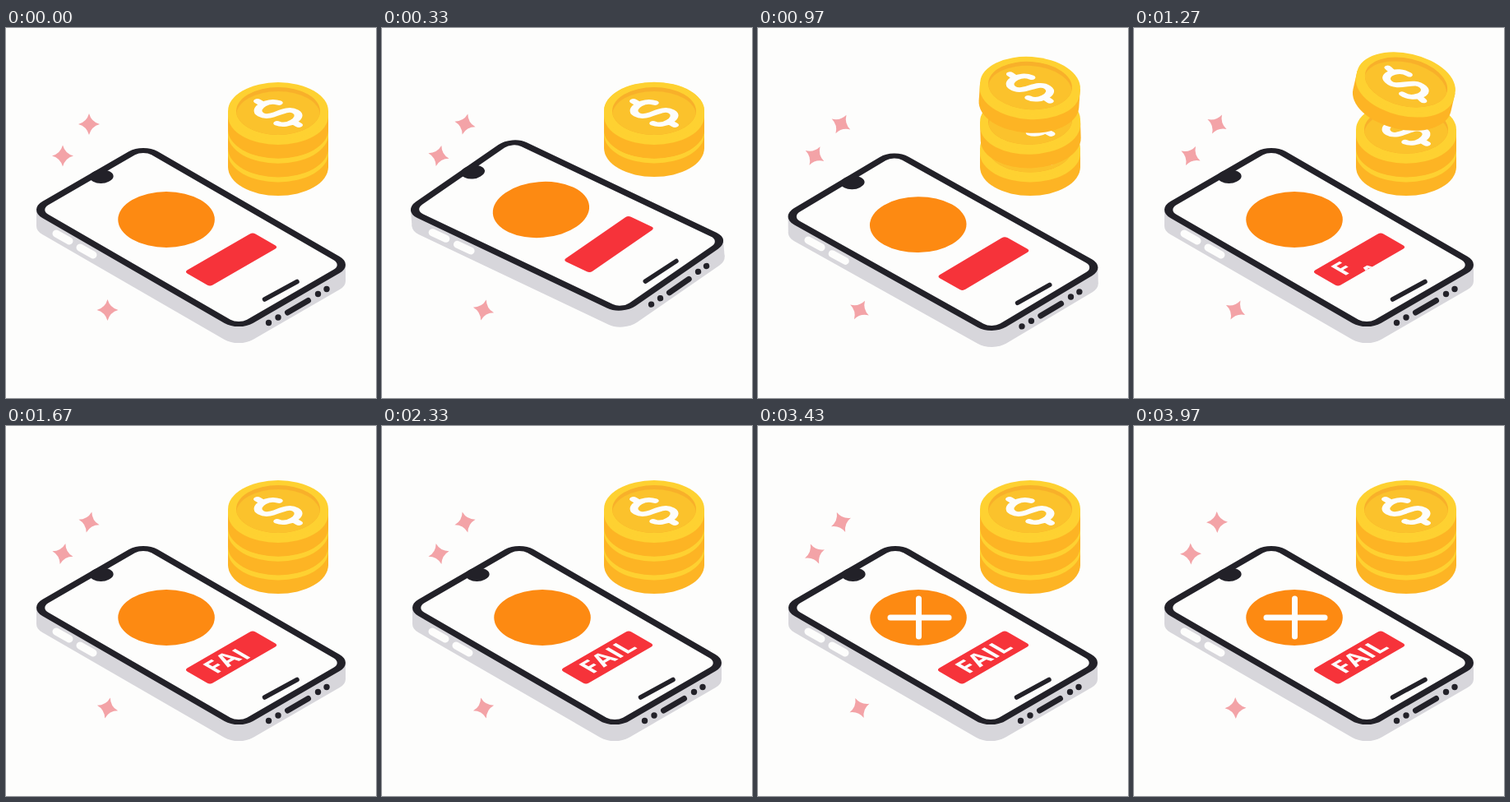
Write an HTML page that moves like this. It is 450 by 450 pixels and loops after 4 s.

```html
<!DOCTYPE html>
<html lang="en">
<head>
<meta charset="utf-8">
<title>Payment failed</title>
<style>
  html, body { margin: 0; width: 100%; height: 100%; overflow: hidden; background: #fdfdfc; }
  svg { display: block; width: 100vw; height: 100vh; }
  .ink { fill: #222128; }
  .line { fill: none; stroke: #222128; stroke-linecap: round; }
  .white { fill: none; stroke: #fdfdfc; stroke-linecap: round; stroke-linejoin: round; }
  .label text { font: 700 30px "Open Sans", "Noto Sans", sans-serif; fill: #fdfdfc; text-anchor: middle; }
</style>
</head>
<body>
<svg viewBox="0 0 450 450">
  <defs>
    <clipPath id="badge"><rect x="37.3" y="-49.3" width="36" height="96" rx="4"/></clipPath>
    <clipPath id="dish"><ellipse rx="51" ry="29"/></clipPath>
    <path id="star" fill="#f3a3a7" d="M0-13Q2.8-2.8 13 0Q2.8 2.8 0 13Q-2.8 2.8-13 0Q-2.8-2.8 0-13Z"/>
    <g id="coin">
      <path fill="#fdb424" d="M-61 0V22.7A61 35 0 0 0 61 22.7V0Z"/>
      <path fill="#fed131" d="M-61 0V6A61 35 0 0 0 61 6V0Z"/>
      <ellipse rx="61" ry="35" fill="#fed131"/>
      <ellipse rx="51" ry="29" fill="#f8b02a"/>
      <g clip-path="url(#dish)"><ellipse cy="5" rx="51" ry="29" fill="#fbc22c"/></g>
      <path class="white" stroke-width="8" transform="matrix(.866 -.5 .866 .5 0 2.5)"
        d="M13-12C11-19 5-21 0-21C-8-21-14-17-14-10.5C-14-3-7-1.5 0 0C7 1.5 14 3 14 10.5C14 17 8 21 0 21C-6 21-12 18-13 12M0-21V-29M0 21V29"/>
    </g>
  </defs>

  <g id="stars"></g>

  <g id="phone">
    <!-- body -->
    <g fill="#d7d6db">
      <path d="M37 221L413 288V308L37 241Z"/>
      <rect x="-147.9" y="-80.9" width="295.8" height="161.8" rx="20" transform="matrix(.866 .5 -.866 .5 225 274.5)"/>
    </g>
    <path class="white" stroke-width="9" d="M61 250L77 259M90 267L106 276"/>
    <!-- top face, drawn in the isometric plane -->
    <g transform="matrix(.866 .5 -.866 .5 225 254.5)">
      <rect class="ink" x="-147.9" y="-80.9" width="295.8" height="161.8" rx="20"/>
      <rect x="-139.5" y="-72.5" width="279" height="145" rx="11.6" fill="#fdfdfc"/>
      <rect class="ink" x="-148" y="-23" width="22.5" height="24" rx="11"/>
      <circle cx="-38.8" cy="-4.2" r="48" fill="#fd8a12"/>
      <rect x="37.3" y="-49.3" width="36" height="96" rx="4" fill="#f6333a"/>
      <g clip-path="url(#badge)">
        <g class="label" id="label" transform="matrix(0 -1 1 0 55.3 -1.3)"></g>
      </g>
    </g>
    <path class="line" stroke-width="5.5" d="M314.5 330L354 308.5"/>
    <path class="line" stroke-width="7" d="M342.5 346L367.5 331.5"/>
    <g class="ink">
      <circle cx="319.5" cy="358.5" r="3.7"/><circle cx="331" cy="352" r="3.7"/>
      <circle cx="379.5" cy="323.5" r="3.7"/><circle cx="390" cy="317.5" r="3.7"/>
    </g>
    <path class="white" id="barA" stroke-width="7"/>
    <path class="white" id="barB" stroke-width="7"/>
  </g>

  <g id="coins"></g>
</svg>
<script>
const LOOP = 4000;
const $ = id => document.getElementById(id);

function add(parent, tag, attrs) {
  const el = document.createElementNS("http://www.w3.org/2000/svg", tag);
  for (const k in attrs) el.setAttribute(k, attrs[k]);
  return parent.appendChild(el);
}

// Steps are [time, lift, tilt].
const phoneSteps = [[0, 0, 0], [120, 8, 1.5], [330, -14.5, -4.6], [730, -10, 3.9], [930, 7, -1], [1080, 0, 0]];

// Bottom coin first, so that the upper ones cover it.
const coins = [
  { y: 146.4, steps: [[0, 0, 0], [60, 0, 0], [330, -23, 0], [480, -23, 0], [730, -20.5, 14], [950, 0, 0]] },
  { y: 123.7, steps: [[0, 0, 0], [60, 0, 0], [330, -23, 0], [480, -23, 0], [730, -31.5, -5], [1130, 0, 0]] },
  { y: 101, steps: [[0, 0, 0], [680, 0, 0], [1100, -40, 5], [1270, -35, 13], [1530, 0, 0]] }
];
for (const c of coins) c.el = add($("coins"), "use", { href: "#coin" });

const stars = [[101, 117], [69, 155.5], [123.5, 343]].map(([x, y]) =>
  ({ x, y, el: add($("stars"), "use", { href: "#star" }) }));

const letters = [["F", -23], ["A", -4.5], ["I", 11], ["L", 25]].map(([ch, x], i) => {
  const el = add($("label"), "text", { x, y: 9.8 });
  el.textContent = ch;
  return { el, start: 950 + i * 280 };
});

const clamp = p => Math.min(1, Math.max(0, p));
const smooth = p => p * p * (3 - 2 * p);
const easeOut = p => 1 - (1 - p) ** 3;

function pose(steps, t) {
  const i = steps.findIndex(s => s[0] > t);
  if (i < 0) return steps[steps.length - 1].slice(1);
  const a = steps[i - 1], b = steps[i];
  const p = smooth((t - a[0]) / (b[0] - a[0]));
  return [1, 2].map(k => a[k] + (b[k] - a[k]) * p);
}

function drawBar(el, p, x, y, dx, dy) {
  el.setAttribute("d", p > 0 ? `M${x} ${y}l${dx * p} ${dy * p}` : "");
}

function render(t) {
  const [lift, tilt] = pose(phoneSteps, t);
  $("phone").setAttribute("transform", `translate(0 ${lift}) rotate(${tilt} 225 254.5)`);

  for (const c of coins) {
    const [dy, rot] = pose(c.steps, t);
    c.el.setAttribute("transform", `translate(331 ${c.y + dy}) rotate(${rot})`);
  }

  const swing = 30 * Math.sin(2 * Math.PI * t / LOOP);
  for (const s of stars)
    s.el.setAttribute("transform", `translate(${s.x} ${s.y}) rotate(${swing})`);

  // Letters rise into the badge one after another.
  for (const l of letters) {
    const p = easeOut(clamp((t - l.start) / 300));
    l.el.setAttribute("transform", `translate(0 ${38 * (1 - p)})`);
  }
  drawBar($("barA"), smooth(clamp((t - 2370) / 230)), 161, 233, 71, 0);
  drawBar($("barB"), smooth(clamp((t - 2570) / 230)), 195.5, 210, 0, 46);
}

const origin = performance.now();
function tick() {
  render((performance.now() - origin) % LOOP);
  requestAnimationFrame(tick);
}
render(0);
requestAnimationFrame(tick);
</script>
</body>
</html>
```
